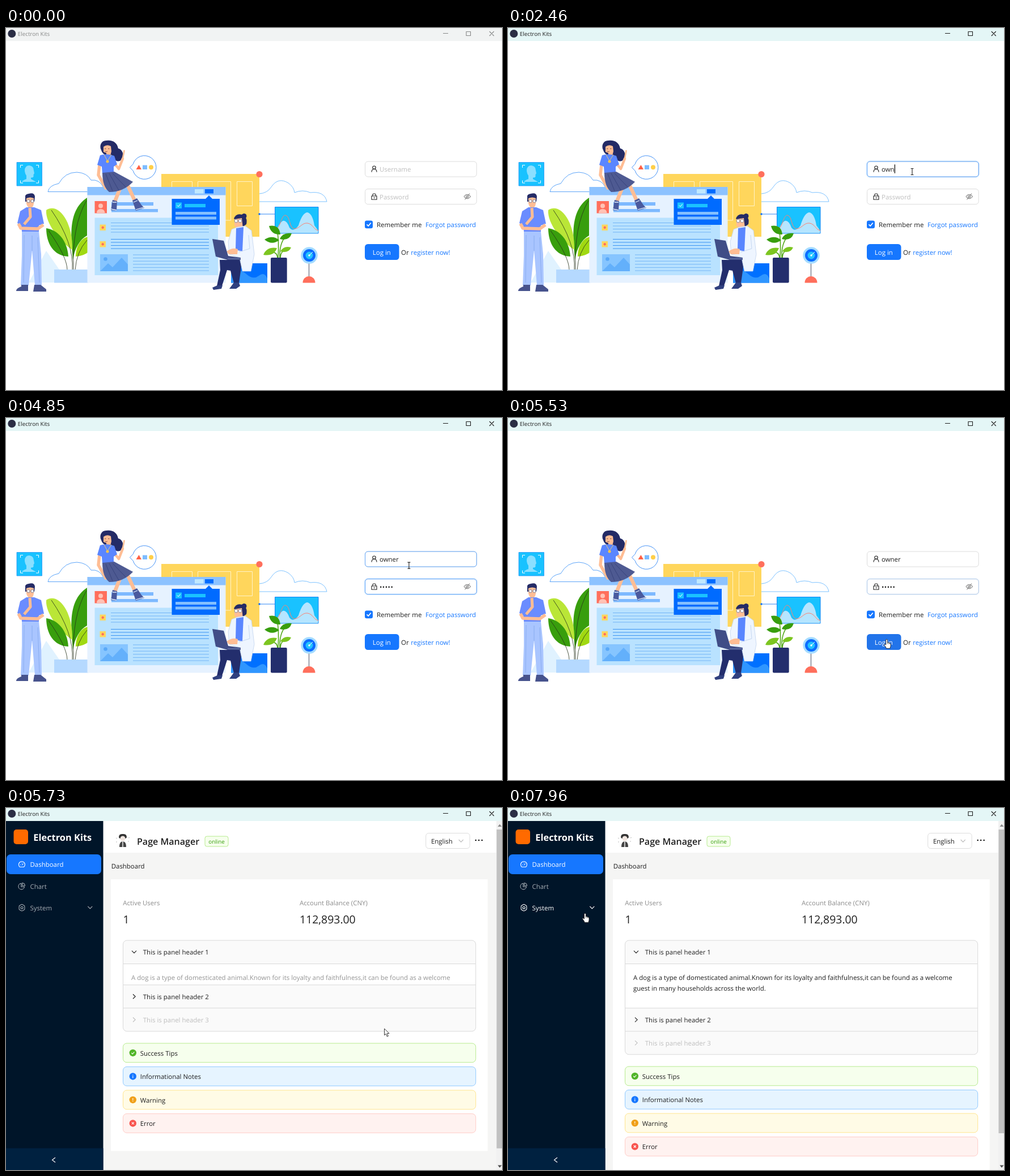
An HTML page that plays this animation: 875 px wide and 640 px high, repeating every 8000 ms.

```html
<!DOCTYPE html>
<html lang="en">
<head>
<meta charset="utf-8">
<title>Electron Kits</title>
<style>
html, body { margin: 0; width: 100%; height: 100%; overflow: hidden; background: #fff; }
#stage { display: block; width: 875px; height: 640px; color: #1f1f1f; --open: 0; --gap: 0px; }
text { font: 11.45px "Open Sans", "Noto Sans", sans-serif; fill: #1f1f1f; text-rendering: geometricPrecision; white-space: pre; }
.small { font-size: 9.8px; }
.soft { fill: #8c8c8c; }
.hint { fill: #bfbfbf; }
.link { fill: #1677ff; }
.light { fill: #fff; }
.value { font-size: 19.4px; }
.line { fill: none; stroke: currentColor; stroke-width: 1.1; }
.field { fill: #fff; stroke: #d9d9d9; stroke-width: .9; }
.hot { fill: none; stroke: #4096ff; stroke-width: .9; }
.glow { fill: none; stroke: #0591ff; stroke-opacity: .08; stroke-width: 1.8; }
#dots { letter-spacing: .55px; }
.menu { color: #a6adb4; }
.menu .on { color: #fff; }
.menu text { fill: currentColor; }
.wide { width: calc(637px - var(--gap)); }
.edge { transform: translateX(calc(-1 * var(--gap))); }
.half { transform: translateX(calc(-.5 * var(--gap))); }
.drop { transform: translateY(calc(78.3px * var(--open))); }
.card { width: calc(679.5px - var(--gap)); height: calc(443px + 78.3px * var(--open)); }
.panel { height: calc(123.5px + 78.3px * var(--open)); }
.body { height: calc(78.3px * var(--open)); }
</style>
</head>
<body>
<svg id="stage" viewBox="0 0 875 640">
<defs>
  <path id="chevron" class="line" d="M-4 -2L0 2.200 4 -2"/>
  <clipPath id="fold"><rect class="wide body" x="206.500" y="275.500"/></clipPath>
  <g id="arrow"><path d="M0 0V11.600L2.700 9.200 4.700 14 6.800 13.100 4.800 8.500H8.400Z" fill="#fff" stroke="#222" stroke-width=".9"/></g>
  <g id="hand"><path d="M-1.500 1.200Q0 -.8 1.300 1.200V6Q3.200 5 4 6.700 6.700 6.300 7 9V12.300Q6.600 13.500 5.900 16.300H-.7Q-1.400 14 -4.600 10 -4.600 7.700 -1.500 10Z" fill="#fff" stroke="#222" stroke-width=".9"/><path d="M1.300 6V8.500M4 6.700V9" stroke="#222" stroke-width=".7"/></g>
  <g id="beam"><path class="line" d="M-2.400 -5.500H-.6L0 -5 .6 -5.500H2.400M0 -5V5M-2.400 5.500H-.6L0 5 .6 5.500H2.400" stroke-width=".9"/></g>
</defs>
<rect width="875" height="640" fill="#fff"/>

<g id="login">
  <!-- portrait card and clouds -->
  <g>
    <path d="M19 237.500H63.500V279H19Z" fill="#19c2ff" stroke="#2894f5" stroke-width=".8"/>
    <path d="M25.500 247V242.500H30M53 242.500H57.500V247M57.500 269.500V274H53M30 274H25.500V269.500" fill="none" stroke="#fff"/>
    <path d="M33 251Q34 243 41 243 49 244 49 252L50 257 48.500 259V263Q47 265 44 264.500V267L53 272H28Q30 269 36 267V261Q33 257 33 251Z" fill="#8adfff"/>
    <path d="M74 289.500Q76 278 93 275 104 255 125 255 143 256 150 269 165 267 172 282V289.500Z" fill="none" stroke="#4a9af8" stroke-width=".9"/>
    <path d="M447 293Q461 292 468 281 480 263 498 274 508 281 509 291 523 285 537 291 562 288 566 307H447" fill="none" stroke="#6fbcff" stroke-width=".9"/>
    <path d="M40 450L71 394 110 450Z" fill="#e0f2ff"/>
  </g>
  <!-- left plant -->
  <g>
    <path d="M118 410C117 380 105 325 143 300V367C130 374 121 390 118 410Z" fill="#389e0d"/>
    <path d="M117 392C95 378 69 345 71 322 91 308 118 340 117 392Z" fill="#bae637"/>
    <path d="M110 404C84 403 71 381 71 354 91 357 108 375 110 404Z" fill="#389e0d"/>
    <path d="M123 404C123 386 132 372 144 369V397C137 402 130 403 123 404Z" fill="#a0d911"/>
    <path d="M108 428Q108 405 75 358M117 428Q120 380 80 322M119 428Q116 350 142 305M122 428Q124 396 143 375" fill="none" stroke="#26321b" stroke-width=".8"/>
    <path d="M85 427H145V450.500H85Z" fill="#b5d9ff"/>
  </g>
  <!-- yellow board, blue block, chart, right plant, dial -->
  <g>
    <path d="M274 258H447V369H274Z" fill="#ffd65c"/>
    <path d="M292.500 290V271.500H328.500V290M338.500 290V271.500H396.500V340H338.500M407.500 271.500H434.500V314.500H407.500Z" fill="none" stroke="#fff3c9"/>
    <circle cx="447" cy="258.500" r="5.600" fill="#ff6f5c"/>
    <path d="M397 416H461V450.500H397Z" fill="#0070ff"/>
    <path d="M397 431Q412 424 424 435T446 438 461 443V450.500H397Z" fill="#2f96ff"/>
    <path d="M447 329H474" stroke="#2f86f5"/><circle cx="447" cy="329" r="1.700" fill="#006bff"/>
    <path d="M474.500 316.500H551V363H474.500Z" fill="#19c2ff" stroke="#1684f5"/>
    <path d="M475 362.500Q481 346 488 341 495 339 500 353 507 362 516 349 523 326 532 326 541 329 544 349L550.500 358V362.500Z" fill="#b5e5ff"/>
    <path d="M475 357C485 353 485 331 493 331 502 333 499 354 509 355 519 354 522 344 532 345 542 347 542 356 551 358" fill="none" stroke="#ff7f6d"/>
    <path d="M480 406Q482 375 478 356M483 406Q482 380 494 368M484 406Q484 395 495 390M479 406Q478 395 466 396" fill="none" stroke="#52a718" stroke-width="1.600"/>
    <g fill="#389e0d"><path d="M464 350Q482 347 484 365 468 366 464 350Z"/><path d="M483 373Q488 361 504 363 500 377 483 373Z"/><path d="M456 374Q470 365 482 375 469 385 456 374Z"/></g>
    <g fill="#7cc520"><path d="M454 401Q460 386 478 389 473 404 454 401Z"/><path d="M484 395Q490 384 503 388 498 399 484 395Z"/></g>
    <rect x="467" y="406" width="28.700" height="44.500" rx="2" fill="#232e6d"/>
    <path d="M534.500 416V441" stroke="#4b5268"/>
    <path d="M523.500 450.500A11 11.500 0 0 1 545.500 450.500Z" fill="#ff6f5c"/>
    <circle cx="535" cy="402" r="14.700" fill="#a5dcff"/><circle cx="535" cy="402" r="11" fill="#0b6cff"/>
    <circle cx="535" cy="402" r="6.500" fill="#22c4ff"/><path d="M535 402L541 396" stroke="#fff"/><circle cx="535" cy="402" r="1.700" fill="#fff"/>
  </g>
  <!-- window -->
  <g>
    <path d="M143.500 281H387.500V450.500H143.500Z" fill="#e6f2ff"/>
    <path d="M143.500 281H387.500V295.500H143.500Z" fill="#8cc2ff"/>
    <path d="M333 285H348.500V292.500H333Z" fill="#bfe8ff"/><path d="M351 285H366V292.500H351Z" fill="#006bff"/>
    <path d="M156.500 335.500H374V437H156.500Z" fill="#b9e2ff"/>
    <path d="M185 344.500H358M185 350H358M185 355.500H358M185 361H358M224 401H358M224 406.600H358M224 412.200H358M224 417.800H358M224 423.400H358M224 429H358" stroke="#6bb2f5" stroke-width=".9"/>
    <path d="M185 373.500H358M185 379H358M185 384.500H358M185 390H358" stroke="#2d8df2" stroke-width=".9"/>
    <path d="M165.500 347.500H176V358H165.500ZM165.500 377H176V387.500H165.500Z" fill="#ffd65c"/>
    <circle cx="170.700" cy="352.700" r="2.200" fill="#ff6f5c"/><circle cx="170.700" cy="382.200" r="2.200" fill="#ff6f5c"/>
    <path d="M166 400H215V430H166Z" fill="#86c5ff"/><path d="M166 430L180 416 188 423 204 406 215 418V430Z" fill="#63b0fb"/><circle cx="175.500" cy="408.500" r="3.300" fill="#5aa9f7"/>
    <path d="M156.500 306H178V327.500H156.500Z" fill="#ff6f5c"/><circle cx="167" cy="314.500" r="4" fill="#ffc2b5"/><path d="M160 327Q160 320 167 320T174.500 327Z" fill="#ffc2b5"/>
    <path d="M186 308H260V314H186ZM186 320H268V325.500H186Z" fill="#7db9ff"/>
    <path d="M292.500 302H352L358 296 364 302H377V348H292.500Z" fill="#006bff"/>
    <path d="M299 308.500H310V319H299ZM315 311H352V317H315Z" fill="#1ac2ff"/><path d="M302 313.500L304 315.800 307.500 311.500" fill="none" stroke="#fff"/>
    <path d="M299 325H371V330H299ZM299 333.500H371V338.500H299Z" fill="#83bfff"/>
  </g>
  <!-- speech bubble -->
  <g>
    <path d="M224.200 240.500A20.800 20.800 0 1 1 224.200 252.500L218.500 246.500Z" fill="#fff" stroke="#3287f5" stroke-width=".9"/>
    <path d="M229.500 250L234.500 242 239 250Z" fill="#ff6045"/><path d="M241 242.500H249V250H241Z" fill="#7dbcff"/><circle cx="256" cy="246.300" r="4" fill="#ffcf48"/>
  </g>
  <!-- seated figure -->
  <g>
    <path d="M178 199C168 198 164 208 168 216 170 224 180 228 188 228 192 237 202 238 204 231 210 223 204 214 198 213 196 203 189 198 178 199Z" fill="#242b66"/>
    <path d="M172 210Q178 205 185 209L186 218 184 226H177L177 221 172 219Z" fill="#ffbd94"/>
    <path d="M174 213.500H176.500M180 213.500H182.500M174.500 218Q177 219.500 179 218" fill="none" stroke="#532f35" stroke-width=".7"/>
    <g fill="none" stroke="#ffbd94" stroke-linejoin="round" stroke-linecap="round"><path d="M190 238L199 249 206 231" stroke-width="4.500"/><path d="M206 230L208.500 217" stroke-width="2.600"/><path d="M165 242L163 260 176 283" stroke-width="5.500"/><path d="M201 284L191.500 308M216 281L227 305" stroke-width="6.500"/></g>
    <path d="M166 225Q178 221 191 226L196 241 190 245V258H170L169 245 161 242Z" fill="#5a86ff"/>
    <path d="M173 224L179 235 186 224" fill="none" stroke="#ffd65c" stroke-width=".8"/><circle cx="179" cy="236" r="2.500" fill="#ffc44a"/>
    <path d="M170 256L191 254 224 272Q207 290 182 290 170 280 170 256Z" fill="#4e5a92"/>
    <path d="M176 258L188 288M182 257L199 287M188 257L211 281" stroke="#333f78" stroke-width=".8"/>
    <path d="M188 304L196 306 195 323 185 322ZM223 305L231 301 239 313 244 318 229 323Z" fill="#4a5a9e"/>
    <path d="M185 320L195 322M229 321L243 317M188 308H195M225 308L232 305" stroke="#dcecff" stroke-width="1.300"/>
  </g>
  <!-- standing figure -->
  <g>
    <path d="M34 299Q33 294 40 293 50 290 51 298L50 307H34Z" fill="#242b66"/>
    <path d="M36 301Q43 298 49 301V310Q48 318 43 318 37 317 36 310Z" fill="#ffbd94"/>
    <g fill="#fff" stroke="#56617f" stroke-width=".8"><circle cx="39.500" cy="306" r="2.600"/><circle cx="46.500" cy="306" r="2.600"/></g>
    <path d="M36 317H50L62 322 67 346 58 349V360H28L27 349 20 345 25 324Z" fill="#6a8cff"/>
    <g fill="none" stroke="#ffbd94" stroke-linejoin="round"><path d="M22 346L26 354 56 355 66 348" stroke-width="5.500"/><path d="M32 347L43 334 42 318" stroke-width="5"/></g>
    <path d="M28 360H58L62 400 63 455H51L46 393 40 455H26L28 402Z" fill="#a9c5ff"/>
    <path d="M46 367V394M32 366L31 450M56 370L59 450" stroke="#83a7ed" stroke-width=".8"/>
    <path d="M27 454H39V465H18Q18 460 27 457ZM50 454H61L71 462V466H48Z" fill="#47538d"/>
  </g>
  <!-- figure with laptop -->
  <g>
    <circle cx="420" cy="332.500" r="4.500" fill="#242b66"/>
    <path d="M402 337Q406 327 416 330 427 334 424 347L417 352Z" fill="#242b66"/>
    <path d="M403 338L416 336 418 354 408 355 403 349Z" fill="#ffbd94"/>
    <g fill="#fff" stroke="#56617f" stroke-width=".7"><circle cx="406" cy="341" r="2.900"/><circle cx="413" cy="341" r="2.900"/></g>
    <path d="M377 410H416L414 430 411 451H402L396 429 390 428 381 456H372L378 428Z" fill="#232e6d"/>
    <path d="M398 356L408 352 422 350 433 358 438 400 432 430H417L412 406 394 400 392 378Z" fill="#eef5ff" stroke="#c0d3ee" stroke-width=".8"/>
    <path d="M406 354L419 352 417 395 405 392Z" fill="#5a86ff"/>
    <path d="M428 366L430 390 411 396" fill="none" stroke="#c0d3ee" stroke-width=".9"/>
    <path d="M373 455H382L380 461 366 463 364 459ZM402 450H411L413 456 406 461H394Z" fill="#30407f"/>
    <path d="M389 395Q400 387 409 391L408 400H393Z" fill="#ffbd94"/>
    <path d="M364 373L384 376 392 403 414 406V410L391 410 370 404Z" fill="#404d87"/><path d="M391 408L414 408" stroke="#7685b8"/>
  </g>

  <!-- form -->
  <rect class="glow" id="glow1" x="632.300" y="234.700" width="199" height="29.600" rx="6"/>
  <rect class="field" x="633.500" y="236" width="196.700" height="27" rx="5"/>
  <rect class="hot" id="hot1" x="633.500" y="236" width="196.700" height="27" rx="5"/>
  <rect class="glow" id="glow2" x="632.300" y="283.300" width="199" height="29.600" rx="6"/>
  <rect class="field" x="633.500" y="284.600" width="196.700" height="27" rx="5"/>
  <rect class="hot" id="hot2" x="633.500" y="284.600" width="196.700" height="27" rx="5"/>
  <g class="line"><circle cx="649.500" cy="246.700" r="2.700"/><path d="M645 254.800Q645 249.500 649.500 249.500T654 254.800M645 297H654V303.300H645ZM646.800 297V294.500Q646.800 293 649.500 293T652.200 294.500V297M649.500 299V301.500"/></g>
  <g class="line" color="#8c8c8c"><path d="M808 298Q813.500 290.500 819.500 298 813.500 305.500 808 298ZM809.500 303.500L818 292.500"/><circle cx="813.700" cy="298" r="2"/></g>
  <text id="hint1" class="hint" x="659" y="254.300">Username</text>
  <text id="hint2" class="hint" x="659" y="302.800">Password</text>
  <text id="name" x="659" y="254.300"></text>
  <text id="dots" x="659" y="302.600"></text>
  <rect id="caret" width="1.200" height="15.500"/>
  <rect x="633" y="340.500" width="14" height="13.800" rx="3.300" fill="#1677ff"/><path d="M636.500 347.300L639.200 350 643.700 344.500" fill="none" stroke="#fff" stroke-width="1.700"/>
  <text x="654" y="352">Remember me</text><text class="link" x="740" y="352">Forgot password</text>
  <rect id="button" x="633" y="382" width="60.500" height="28" rx="5.300"/>
  <text class="light" x="646.800" y="401">Log in</text><text x="697" y="401">Or</text><text class="link" x="714.300" y="401">register now!</text>
</g>

<g id="dash">
  <path d="M171 79H875V640H171Z" fill="#f5f5f4"/>
  <path d="M0 23H171.500V640H0Z" fill="#001529"/><path d="M0 601.500H171.500V640H0Z" fill="#002140"/>
  <path d="M87 618L81.500 622.300 87 626.500" class="line" color="#fff"/>
  <rect x="13.500" y="38" width="25.500" height="26" rx="5" fill="#ff6a00"/>
  <text class="light" x="48.300" y="57.700" style="font-size:16.400px;font-weight:700">Electron Kits</text>
  <g class="menu">
    <rect x="1" y="82" width="167" height="35" rx="7" fill="#1677ff"/>
    <g class="on"><path class="line" d="M24.300 104.200A5.500 5.500 0 1 1 31.500 104.200ZM28 101L30.500 98.300M25 100.500H26M28 96.500V97.500"/><text x="42.500" y="104.300">Dashboard</text></g>
    <path class="line" d="M26.800 133.300A5.300 5.300 0 1 0 32.500 139.300H26.800ZM28.700 132.500V137.300H33.500Q33 133 28.700 132.500Z"/><text x="42.500" y="142.700">Chart</text>
    <g id="system"><path class="line" d="M26 171.200L28 170.300 30 171.200 32.700 173 33 177 32.700 179.500 30 181.200 28 182 26 181.200 23.300 179.500 23 177 23.300 173Z"/><circle class="line" cx="28" cy="176.200" r="2"/><text x="42.500" y="181.200">System</text><use href="#chevron" x="148.300" y="175.800"/></g>
  </g>
  <!-- header -->
  <path d="M199 52Q199 45 206 46 213 45 213 52L211 54H201Z" fill="#333"/><circle cx="206" cy="54" r="4.500" fill="#f0e5df"/>
  <path d="M200 69Q200 59 206 59T212 69Z" fill="#444"/><path d="M206 59V69" stroke="#eee" stroke-width="1.500"/><path d="M194 53L196 54M194 60H196M216 53L218 52M215 59H217" stroke="#bbb"/>
  <text x="231" y="64.500" style="font-size:16.050px;font-weight:600">Page Manager</text>
  <rect x="351" y="50" width="41" height="18" rx="3.500" fill="#f6ffed" stroke="#b7eb8f"/><text class="small" x="357.300" y="62.500" style="fill:#389e0d">online</text>
  <g class="edge"><rect class="field" x="755.500" y="44.500" width="77.500" height="27" rx="5"/><text x="764.700" y="62.500">English</text><use href="#chevron" x="817.500" y="58" opacity=".3"/><circle cx="843.500" cy="57" r="1.200"/><circle cx="849" cy="57" r="1.200"/><circle cx="854.500" cy="57" r="1.200"/></g>
  <text x="185.700" y="107.200">Dashboard</text>
  <!-- content -->
  <rect class="card" x="185" y="126" fill="#fff"/>
  <text class="soft" x="206.300" y="172.200">Active Users</text><text id="count" class="value" x="206.500" y="204.300">0</text>
  <g class="half"><text class="soft" x="525.300" y="172.200">Account Balance (CNY)</text><text class="value" x="525.500" y="204.300">112,893.00</text></g>
  <rect class="wide panel" x="206.500" y="234" rx="7" fill="#fafafa"/>
  <use href="#chevron" x="226" y="254.300"/><text x="241.800" y="259.200">This is panel header 1</text>
  <rect class="wide body" x="206.500" y="275.500" fill="#fff"/>
  <g id="story" clip-path="url(#fold)"><text x="221" y="304.300">A dog is a type of domesticated animal.Known for its loyalty and faithfulness,it can be found as a welcome</text><text x="221" y="322.800">guest in many households across the world.</text></g>
  <rect class="wide" x="206.500" y="275" height="1" fill="#d9d9d9"/>
  <g class="drop">
    <rect class="wide" x="206.500" y="275" height="1" fill="#d9d9d9"/><rect class="wide" x="206.500" y="316" height="1" fill="#d9d9d9"/>
    <use href="#chevron" transform="translate(226 296)rotate(-90)"/><text x="241.800" y="300.700">This is panel header 2</text>
    <g opacity=".27"><use href="#chevron" transform="translate(226 337)rotate(-90)"/><text x="241.800" y="341.700">This is panel header 3</text></g>
  </g>
  <rect class="wide panel" x="206.500" y="234" rx="7" fill="none" stroke="#d9d9d9"/>
  <g class="drop"><g id="alerts"></g><text class="half" x="525" y="620" text-anchor="middle">Electron Kits ©2023 Created by Liang Soe</text></g>
  <g id="scroll"><path d="M865 23H875V640H865Z" fill="#f1f1f1"/><rect id="thumb" x="865.500" y="38" width="9.500" fill="#c1c1c1"/><path d="M867.500 33L871 28.500 874.500 33Z" fill="#8a8a8a"/><path d="M867.500 631.500L871 636 874.500 631.500Z" fill="#505050"/></g>
</g>

<!-- title bar -->
<rect width="875" height="23" fill="#f1f3f3"/><rect id="active" width="875" height="23" fill="#e4f6f6"/>
<circle cx="10.300" cy="10" r="7" fill="#2b2e45"/>
<g id="caption"><text class="small" x="20.800" y="13.700">Electron Kits</text><path class="line" d="M771 9.500H780M812 6.500H819.500V13.500H812ZM852.800 6L860.800 14M860.800 6L852.800 14"/></g>
<use id="cursor"/>
</svg>
<script>
const $ = id => document.getElementById(id);
const LOOP = 8000, LOGGED_IN = 5590;
const clamp = v => Math.min(1, Math.max(0, v));
const ramp = (t, a, b) => clamp((t - a) / (b - a));
const ease = p => p * p * (3 - 2 * p);
const typed = (t, times) => times.filter(at => t >= at).length;
const show = (el, on) => el.style.display = on ? '' : 'none';
const mix = (a, b, p) => `rgb(${a.map((v, i) => Math.round(v + (b[i] - v) * p))})`;

const tick = 'M-2.500 0L-.7 1.900 2.600 -1.700', info = 'M0 -.7V3M0 -3V-1.800', bang = 'M0 -3V.8M0 1.900V3', cross = 'M-2 -2L2 2M2 -2L-2 2';
$('alerts').innerHTML = [
  ['Success Tips', '#f6ffed', '#b7eb8f', '#52b52a', tick],
  ['Informational Notes', '#e6f4ff', '#91caff', '#1677ff', info],
  ['Warning', '#fffbe6', '#ffe58f', '#f0a01a', bang],
  ['Error', '#fff2f0', '#ffccc7', '#f8544e', cross]
].map(([label, fill, edge, color, mark], i) => `<g transform="translate(0 ${i * 41.5})">
  <rect class="wide" x="206.500" y="378.700" height="33.800" rx="6.500" fill="${fill}" stroke="${edge}"/>
  <g transform="translate(223.800 395.700)"><circle r="6.200" fill="${color}"/><path d="${mark}" fill="none" stroke="#fff" stroke-width="1.100"/></g>
  <text x="236.700" y="400.700">${label}</text></g>`).join('');

const path = [
  [510, 735, 559], [1000, 713, 254], [4790, 713, 254], [5250, 669, 391], [5600, 668, 391], [5870, 667, 389],
  [6000, 460, 349], [6400, 460, 349], [6670, 284, 259], [7620, 284, 259], [7960, 136, 186]
];
const nameKeys = [2060, 2260, 2460, 2560, 2660], dotKeys = [3310, 3450, 3580, 3710, 3860];

function pointer(t) {
  const i = path.findIndex(k => k[0] > t);
  if (i < 0) return path[path.length - 1].slice(1);
  const [a, x, y] = path[Math.max(0, i - 1)], [b, u, v] = path[i];
  const p = ease(ramp(t, a, b));
  return [x + (u - x) * p, y + (v - y) * p];
}

function pointerShape(t, x, y) {
  const within = (a, b) => y > a && y < b;
  if (t < LOGGED_IN) {
    if (within(236, 263) || within(284, 312)) return 'beam';
    return within(340, 355) || within(382, 410) && x < 693 ? 'hand' : 'arrow';
  }
  const pressed = t > 5800 && t < 5900;
  return pressed || within(234, 275) && x > 206 || within(159, 194) && x < 168 ? 'hand' : 'arrow';
}

function caretOn(t) {
  const blink = since => Math.floor((t - since) / 530) % 2 === 0;
  if (t < 1070 || t >= 5400) return false;
  const resets = [1070, ...nameKeys, 2920, ...dotKeys];
  return blink(resets.filter(at => at <= t).pop());
}

function drawLogin(t) {
  const n = typed(t, nameKeys), d = typed(t, dotKeys);
  $('name').textContent = 'owner'.slice(0, n);
  $('dots').textContent = '•'.repeat(d);
  show($('hint1'), !n);
  show($('hint2'), !d);
  const onName = t < 2920;
  $('hot1').style.opacity = ramp(t, 960, 1160) - ramp(t, 4830, 5030);
  $('glow1').style.opacity = ramp(t, 1070, 1270) - ramp(t, 2920, 3120);
  $('hot2').style.opacity = $('glow2').style.opacity = ramp(t, 2920, 3120) - ramp(t, 5400, 5600);
  show($('caret'), caretOn(t));
  $('caret').setAttribute('x', 659.2 + $(onName ? 'name' : 'dots').getComputedTextLength());
  $('caret').setAttribute('y', onName ? 241.3 : 290.3);
  const hover = [64, 150, 255];
  $('button').style.fill = t < 5400
    ? mix([22, 119, 255], hover, ramp(t, 5180, 5380))
    : mix(hover, [9, 88, 217], ramp(t, 5400, 5640));
}

function drawDash(t, x, y) {
  const open = ease(ramp(t, 5610, 5860)), scrolls = open > .05;
  const style = $('stage').style;
  style.setProperty('--open', open);
  style.setProperty('--gap', scrolls ? '14.8px' : '0px');
  show($('scroll'), scrolls);
  $('thumb').setAttribute('height', 588 - 51 * open);
  $('story').style.opacity = open;
  $('count').textContent = t < 5720 ? 0 : 1;
  $('system').classList.toggle('on', x < 168 && y < 194);
}

function draw(t) {
  const [x, y] = pointer(t), inside = t >= LOGGED_IN;
  show($('login'), !inside);
  show($('dash'), inside);
  inside ? drawDash(t, x, y) : drawLogin(t);
  $('active').style.opacity = ramp(t, 1070, 1250);
  $('caption').style.opacity = .5 + .5 * ramp(t, 1070, 1340);
  show($('cursor'), t >= 510);
  $('cursor').setAttribute('href', '#' + pointerShape(t, x, y));
  $('cursor').setAttribute('transform', `translate(${x} ${y})`);
}

const start = performance.now();
(function frame() {
  draw((performance.now() - start) % LOOP);
  requestAnimationFrame(frame);
})();
</script>
</body>
</html>
```
